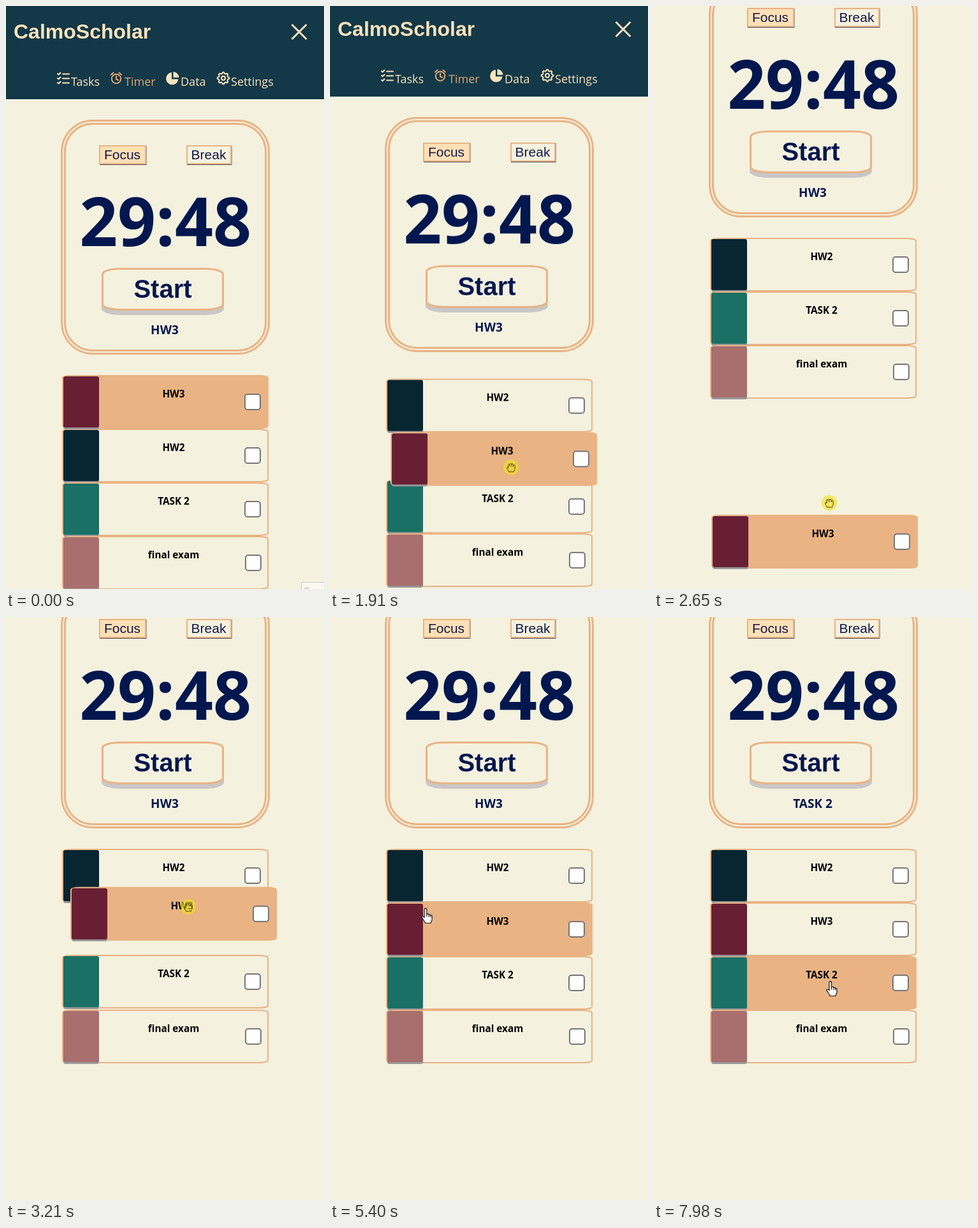
An HTML page for the animation above (8000 ms loop, 499x913 px).

```html
<!DOCTYPE html>
<html lang="en">
<head>
<meta charset="utf-8">
<title>Study timer</title>
<style>
  html, body { margin: 0; width: 100%; height: 100%; overflow: hidden; background: #f4f1de; }
  svg { display: block; width: 100%; height: 100%; }
  text { font-family: "Open Sans", "Noto Sans", sans-serif; }
  .arial { font-family: "Liberation Sans", Arial, sans-serif; }
  .mid { text-anchor: middle; }
  .bold { font-weight: 700; }
  .nav { font-size: 18px; fill: #ffe3bb; }
  .navy { fill: #03174f; }
  .line { fill: none; stroke: #e9b384; }
  .icon { fill: none; stroke: #ffe3bb; stroke-width: 2; stroke-linecap: round; stroke-linejoin: round; }
  .pen { fill: #fff; stroke: #111; stroke-width: 1.2; stroke-linejoin: round; }
</style>
</head>
<body>
<svg viewBox="0 0 499 913">
  <rect width="499" height="913" fill="#f4f1de"/>
  <g id="page">
    <rect width="499" height="146" fill="#133848"/>
    <text class="arial bold" x="12" y="51" font-size="32" fill="#ffe3bb">CalmoScholar</text>
    <path class="icon" style="stroke-width:3;stroke-linecap:butt" d="M448.500 29l23 23m0-23l-23 23"/>

    <path class="icon" d="M89 106.500h10M89 113.500h10M89 120.500h10M81 106l1.500 1.500 3-3M81 113l1.500 1.500 3-3M81 120l1.500 1.500 3-3"/>
    <text class="nav" x="102" y="125">Tasks</text>

    <g class="icon" style="stroke:#e3a572">
      <circle cx="173" cy="114" r="7.200"/>
      <path d="M173 110v4.500l3 1.500M165 107.500l3.500-3M181 107.500l-3.500-3"/>
    </g>
    <text class="nav" x="186" y="125" style="fill:#e3a572">Timer</text>

    <path fill="#ffe3bb" d="M260 104v10.500h10.500A9.700 9.700 0 1 1 260 104zM262.500 103a9.500 9.500 0 0 1 9 9h-9z"/>
    <text class="nav" x="274" y="125">Data</text>

    <path id="gear" class="icon"/>
    <circle class="icon" cx="341" cy="113" r="3"/>
    <text class="nav" x="353" y="125">Settings</text>

    <rect class="line" x="87.500" y="179.500" width="325" height="365" rx="48.500" stroke-width="3"/>
    <rect class="line" x="92.500" y="184.500" width="315" height="355" rx="43.500" stroke-width="3"/>

    <path fill="#4a4a58" d="M147 219h73.500v30H147zM284 219h70.500v30H284z"/>
    <rect x="147" y="219" width="72" height="28" fill="#ffe0b5" stroke="#e9b384" stroke-width="2"/>
    <rect x="284" y="219" width="69" height="28" fill="#f4f1de" stroke="#e9b384" stroke-width="2"/>
    <text class="arial mid" x="182.500" y="240" font-size="21" fill="#10184a">Focus</text>
    <text class="arial mid" x="318" y="240" font-size="21" fill="#10184a">Break</text>

    <text class="mid bold navy" x="250" y="376" font-size="105">29:48</text>

    <rect x="150" y="417" width="192" height="67" rx="29" ry="10" fill="#c9c7c6"/>
    <rect x="151.500" y="411.500" width="189" height="64" rx="27.500" ry="8.500" fill="#f4f1de" stroke="#e9b384" stroke-width="3"/>
    <text class="arial mid bold navy" x="246" y="457" font-size="40">Start</text>
    <g id="current"></g>
    <g id="list"></g>
  </g>
  <g id="top"></g>

  <g id="badge">
    <rect x="463.500" y="902.500" width="40" height="20" fill="#faf9f0" stroke="#cfcdc0"/>
    <path d="M469 913a3 2 0 0 1 6 0" fill="none" stroke="#aaa"/>
  </g>

  <g id="cursor">
    <path id="arrow" class="pen" d="M-8-12v17l4-3.500 3 7 3-1.300-3-6.700h5.500z"/>
    <path id="pointer" class="pen" d="M-4-9.500C-4-12.300-.5-12.300-.5-9.500V-2C.5-3.500 2.800-3 3-1.200 4-2.300 5.500-1.800 5.700-.3 7-1.200 8-.3 8 1V5C8 7.500 6 9 6 11.500H-3C-3 9-7.500 4.500-8 2.500-8.300.5-6 .3-4 3zM-.5-2V1.500M3-1V2M5.700 0V2.500"/>
    <g id="grab">
      <circle r="12" fill="#f5e21c" opacity=".65"/>
      <path fill="none" stroke="#3b3722" stroke-linejoin="round" d="M-3.500 7C-4 4.500-7 2.500-6.500.3-6-.8-4.500 0-4 1L-4.500-3.500C-4.500-5.500-2.300-5.500-2-3.800-2-6.500.5-6.500.8-4.300 1.300-6.200 3.500-5.700 3.500-3.500 4.500-4.600 6.300-4 6.200-2V2C6.200 4 4.700 5 4.500 7zM-2-3.800V-1.500M.8-4.300V-1.500M3.500-3.500V-1"/>
    </g>
  </g>
</svg>
<script>
const LOOP = 8000;
const $ = id => document.getElementById(id);

function play(el, frames) {
  const last = frames[frames.length - 1];
  const all = [{ ...frames[0], at: 0 }, ...frames, { ...last, at: LOOP }];
  el.animate(all.map(({ at, ...f }) => ({ ...f, offset: at / LOOP })),
    { duration: LOOP, iterations: Infinity });
}

// Linear path through [time, x, y] stops.
const travel = (el, stops) => play(el, stops.map(([at, x, y]) =>
  ({ at, transform: `translate(${x}px, ${y}px)` })));

// Visible during each [from, to) span.
function show(el, ...spans) {
  const frames = spans.flatMap(([from, to]) => [[from, 1], [to, 0]])
    .filter(([at]) => at < LOOP)
    .map(([at, opacity]) => ({ at, opacity, easing: 'step-end' }));
  if (frames[0].at > 0) frames.unshift({ at: 0, opacity: 0, easing: 'step-end' });
  play(el, frames);
}

// A list slot change: quick start, long settle.
function slide(el, y, ...moves) {
  const put = (at, v, easing = 'linear') =>
    ({ at, transform: `translate(88px, ${v}px)`, easing });
  const frames = [];
  for (const [start, target] of moves) {
    frames.push(put(start, y, 'cubic-bezier(.2, 1, .1, 1)'), put(start + 330, target));
    y = target;
  }
  play(el, frames);
}

function add(parent, html) {
  parent.insertAdjacentHTML('beforeend', html);
  return parent.lastElementChild;
}

function card(parent, name, color, span, shift = 0) {
  const el = add(parent, `<g>
    <rect class="line" x="1" y="1" width="322" height="82" rx="15" ry="3.500" stroke-width="2"/>
    <rect class="fill" width="324" height="84" rx="16" ry="4.500" fill="#e9b384" opacity="0"/>
    <rect x="2" y="5" width="56" height="80" rx="3" fill="#999798"/>
    <rect x="2" y="2" width="56" height="80" rx="3" fill="${color}"/>
    <text class="mid bold" x="175" y="35" font-size="15.300">${name}</text>
    <rect x="${287 + shift}" y="30" width="24" height="24" rx="4" fill="#fff" stroke="#767676" stroke-width="2"/>
  </g>`);
  if (span) {
    show(el.querySelector('.fill'), span);
    show(add($('current'),
      `<text class="mid bold navy" x="249" y="514" font-size="19">${name}</text>`), span);
  }
  return el;
}

$('gear').setAttribute('d', 'M' + Array.from({ length: 32 }, (_, i) => {
  const r = i % 4 < 2 ? 9.3 : 7.3, a = (i - .5) * Math.PI / 16;
  return `${341 + r * Math.cos(a)} ${113 + r * Math.sin(a)}`;
}).join('L') + 'z');

const PICK_2 = 5640, PICK_3 = 7860;
const hw2 = card($('list'), 'HW2', '#082532', [PICK_2, PICK_3]);
const task = card($('list'), 'TASK 2', '#1a7065', [PICK_3, LOOP]);
const exam = card($('list'), 'final exam', '#a86f6e', null, 1);
const hw3 = card($('top'), 'HW3', '#691f33', [0, PICK_2]);

slide(hw2, 662, [1830, 578]);
slide(task, 746, [2135, 662], [3065, 746]);
slide(exam, 830, [2225, 746], [2980, 830]);

travel($('page'), [[1860, 0, 0], [1910, 0, -4], [2050, 0, -28], [2250, 0, -77],
  [2400, 0, -136], [2580, 0, -215]]);

travel(hw3, [[1270, 88, 578], [1500, 91, 600], [1700, 93, 640], [1910, 95, 667],
  [2050, 97, 715], [2250, 100, 761], [2450, 96, 790], [2650, 90, 797], [2700, 91, 790],
  [2810, 98, 683], [2910, 103, 610], [3050, 107, 490], [3210, 101, 423], [3270, 99, 412],
  [3430, 99, 412], [3490, 92, 437], [3570, 89, 445], [3700, 88, 447]]);

travel($('cursor'), [[370, 446, 925], [500, 415, 850], [700, 350, 740], [900, 300, 660],
  [1170, 280, 631], [1270, 279, 632], [1500, 282, 655], [1700, 283, 695], [1910, 284, 722],
  [2050, 286, 766], [2250, 287, 809], [2450, 282, 800], [2650, 275, 778], [2700, 277, 772],
  [2810, 283, 714], [2910, 288, 641], [3050, 292, 521], [3210, 286, 454], [3270, 284, 443],
  [3430, 284, 443], [3700, 262, 455], [4000, 225, 480], [4230, 190, 497], [4270, 187, 498],
  [4600, 160, 494], [5070, 127, 490], [5400, 152, 468], [5600, 190, 430], [5770, 198, 421],
  [6040, 198, 421], [6400, 215, 475], [6810, 243, 571], [6910, 243, 572], [6980, 246, 582],
  [7540, 246, 582], [7800, 275, 582], [7980, 279, 582]]);

show($('arrow'), [370, 530]);
show($('pointer'), [530, 1230], [3440, LOOP]);
show($('grab'), [1230, 3440]);
show($('badge'), [0, 20]);
</script>
</body>
</html>
```
